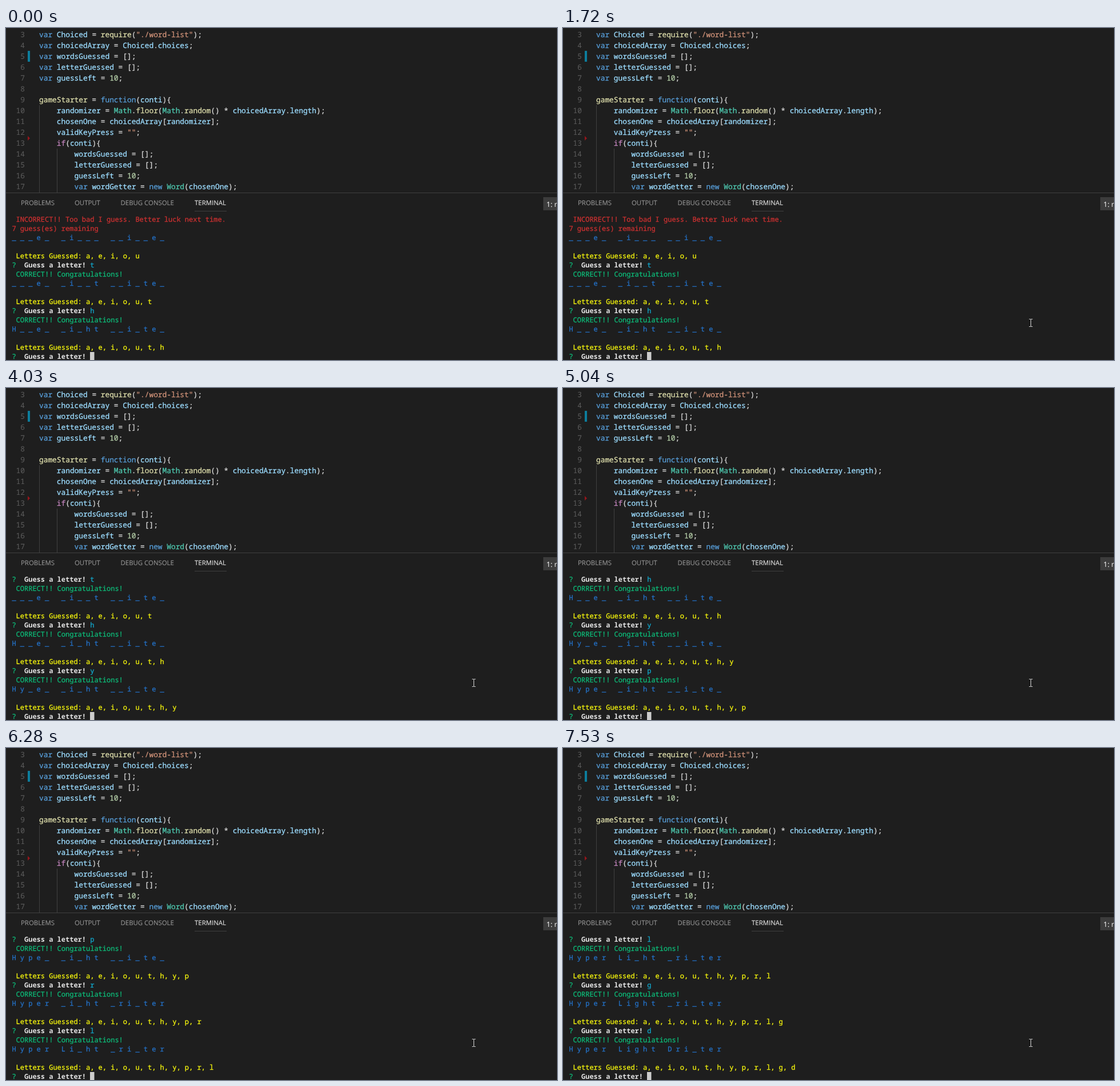
Recreate the animation shown at these times as an HTML page. Size 964 by 581 pixels, loop 8000 ms.

```html
<!DOCTYPE html>
<html lang="en">
<head>
<meta charset="utf-8">
<title>Word guessing game in a terminal</title>
<style>
  html, body { margin: 0; width: 100%; height: 100%; overflow: hidden; background: #1e1e1e; }
  svg { display: block; }
  text { white-space: pre; text-rendering: geometricPrecision; }
  text, tspan { fill: currentColor; stroke: currentColor; }
  #code, #term { font-family: "Noto Sans Mono", "DejaVu Sans Mono", monospace; stroke-width: .3px; }
  #code { font-size: 12.83px; color: #d4d4d4; }
  #term { font-size: 12px; }
  #panel { font: 11.4px "Open Sans", "Noto Sans", sans-serif; color: #979797; stroke-width: .1px; }
  #code .num { color: #5a5a5a; text-anchor: end; stroke-width: .1px; }
  .bold { font-weight: 700; color: #e5e5e5; stroke-width: 0; }
</style>
</head>
<body>
<svg width="964" height="581" viewBox="0 0 964 581">
  <rect width="964" height="581" fill="#1e1e1e"/>
  <g fill="#404040">
    <rect x="58" y="135" width="1" height="153"/>
    <rect x="89" y="211" width="1" height="77"/>
    <rect y="288" width="964" height="1"/>
    <rect x="330" y="320" width="56" height="1"/>
  </g>
  <rect x="38" y="40" width="4" height="19" fill="#0c7d9d"/>
  <path d="M38 189l4 4l-4 4z" fill="#94151b"/>
  <g id="code"></g>
  <g id="panel">
    <text x="26" y="310">PROBLEMS</text>
    <text x="120" y="310">OUTPUT</text>
    <text x="200.5" y="310">DEBUG CONSOLE</text>
    <text x="330" y="310" color="#e7e7e7">TERMINAL</text>
    <rect x="940" y="296" width="24" height="23" fill="#3c3c3c"/>
    <text x="945.5" y="313" font-size="12.5" color="#f0f0f0">1: node</text>
  </g>
  <g id="term"></g>
  <rect id="caret" y="567" width="7.5" height="14" fill="#cccccc"/>
  <path id="mouse" d="M-3 -6.5h2.5l.5 .5l.5 -.5h2.5M0 -6v12M-3 6.5h2.5l.5 -.5l.5 .5h2.5"
        fill="none" stroke="#d8d8d8" stroke-width="1"/>
</svg>
<script>
const LOOP = 8000;
const $ = id => document.getElementById(id);
const span = (color, s) => `<tspan color="${color}">${s}</tspan>`;

// Editor
const source = `var Choiced = require("./word-list");
var choicedArray = Choiced.choices;
var wordsGuessed = [];
var letterGuessed = [];
var guessLeft = 10;

gameStarter = function(conti){
    randomizer = Math.floor(Math.random() * choicedArray.length);
    chosenOne = choicedArray[randomizer];
    validKeyPress = "";
    if(conti){
        wordsGuessed = [];
        letterGuessed = [];
        guessLeft = 10;
        var wordGetter = new Word(chosenOne);`;

const syntax = [
  [/^"/, '#ce9178'],
  [/^\d/, '#b5cea8'],
  [/^(var|function|new)$/, '#569cd6'],
  [/^if$/, '#c586c0'],
  [/^(Math|Word)$/, '#4ec9b0'],
  [/^(require|floor|random|gameStarter)$/, '#dcdcaa'],
  [/./, '#9cdcfe']
];
const paint = line => line.replace(/"[^"]*"|\w+/g,
  word => span(syntax.find(([rule]) => rule.test(word))[1], word));

$('code').innerHTML = source.split('\n').map((line, i) => {
  const y = 16 + i * 19;
  const indent = line.search(/\S|$/);
  return `<text class="num" x="33" y="${y}">${i + 3}</text>` +
    `<text x="${58 + indent * 7.7}" y="${y}">${paint(line.trim())}</text>`;
}).join('');

// Terminal
const RED = '#cd3131', GREEN = '#0dbc79', YELLOW = '#f8f80c', BLUE = '#2472c8', CYAN = '#11a8cd';
const LEFT = 10.4, CELL = 7.2, ROWS = 16;
const ANSWER = 'Hyper Light Drifter';

// letter, time typed, time entered
const guesses = [
  ['t', -2, -1], ['h', -2, -1],
  ['y', 3030, 4030], ['p', 4670, 5040], ['r', 5450, 5590],
  ['l', 6060, 6280], ['g', 6750, 6830], ['d', 7470, 7530]
];

const prompt = (letter, color) =>
  span(GREEN, '?') + '  <tspan class="bold">Guess a letter!</tspan> ' + span(color, letter);

const board = known => [
  span(BLUE, [...ANSWER].map(c =>
    c === ' ' || known.includes(c.toLowerCase()) ? c : '_').join(' ')),
  '',
  span(YELLOW, ' Letters Guessed: ' + known.join(', '))
];

function termRows(entered, typed) {
  const known = [...'aeiou'];
  const rows = [
    span(RED, ' INCORRECT!! Too bad I guess. Better luck next time.'),
    span(RED, '7 guess(es) remaining'),
    ...board(known)
  ];
  for (const [letter] of guesses.slice(0, entered)) {
    known.push(letter);
    rows.push(prompt(letter, CYAN), span(GREEN, ' CORRECT!! Congratulations!'), ...board(known));
  }
  rows.push(prompt(typed, GREEN));
  return rows.slice(-ROWS);
}

let shown = '';
function drawTerm(t) {
  const entered = guesses.filter(g => t >= g[2]).length;
  const next = guesses[entered];
  const typed = next && t >= next[1] ? next[0] : '';
  const state = entered + typed;
  if (state === shown) return;
  shown = state;
  $('term').innerHTML = termRows(entered, typed).map((row, i) =>
    `<text x="${LEFT}" y="${339 + i * 16}">${row}</text>`).join('');
  $('caret').setAttribute('x', LEFT + (19 + typed.length) * CELL - 0.2);
}

// Pointer moves: start, end, steps, path
const moves = [
  [550, 1090, 8, [[793, 558], [775, 564], [773, 563]]],
  [1550, 1720, 3, [[788, 547], [803, 531], [818, 516]]]
];

function along(path, k) {
  const at = k * (path.length - 1);
  const i = Math.min(Math.floor(at), path.length - 2);
  return path[i].map((v, axis) => v + (path[i + 1][axis] - v) * (at - i));
}

function drawMouse(t) {
  const move = moves.filter(m => t >= m[0]).pop();
  $('mouse').style.display = move ? '' : 'none';
  if (!move) return;
  const [start, end, steps, path] = move;
  const k = Math.min(1, (t - start) / (end - start));
  const [x, y] = along(path, Math.floor(k * (steps - 1) + 1e-6) / (steps - 1));
  $('mouse').setAttribute('transform', `translate(${Math.floor(x) + 0.5} ${Math.floor(y)})`);
}

const begin = performance.now();
function tick() {
  const t = (performance.now() - begin) % LOOP;
  drawTerm(t);
  drawMouse(t);
  requestAnimationFrame(tick);
}
tick();
</script>
</body>
</html>
```
